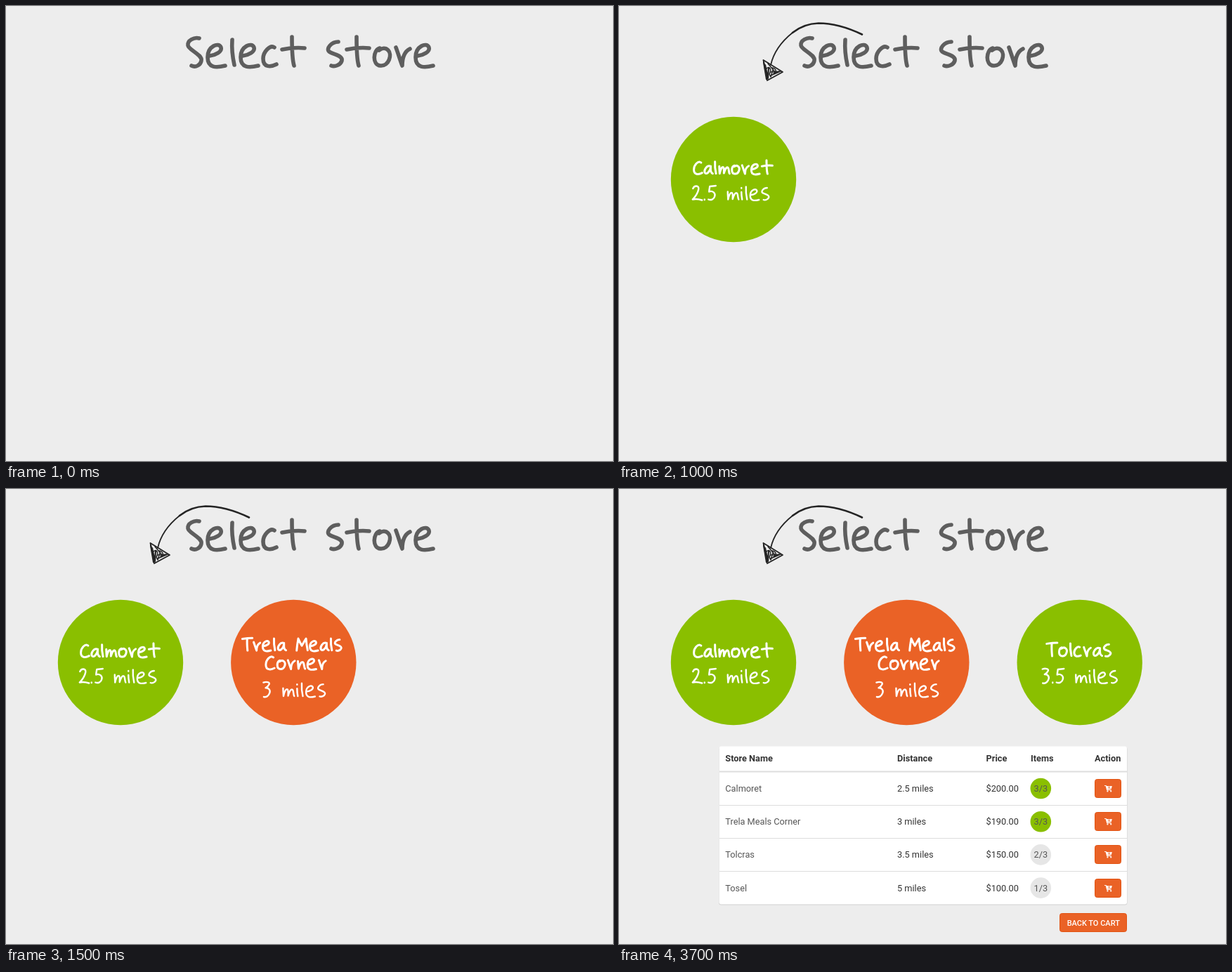
An HTML page for the animation above (4.5 s loop, 864 by 648 pixels).

```html
<!DOCTYPE html>
<html lang="en">
<head>
<meta charset="utf-8">
<title>Select store</title>
<style>
  html, body { margin: 0; width: 100%; height: 100%; overflow: hidden; background: #ededed; }
  svg { display: block; width: 864px; height: 648px; }
  text { font: 12.75px Roboto, sans-serif; fill: #333; }
  .head { font-weight: 700; }
  .name, .count { fill: #555; }
  .mid { text-anchor: middle; }
  .back { font-size: 11px; font-weight: 500; fill: #fff; }
  .hand { fill: none; stroke-linecap: round; stroke-linejoin: round; }
  .green { fill: #8abf00; }
  .orange { fill: #ea6226; }
  .grey { fill: #e6e6e6; }
  .button { fill: #ea6226; stroke: #e25312; }
  .ink { fill: none; stroke: #242424; stroke-linecap: round; stroke-linejoin: round; }

  .step { opacity: 0; animation: 4500ms step-end infinite; }
  #arrow { animation-name: show1; }
  #store1 { animation-name: show2; }
  #store2 { animation-name: show3; }
  #store3 { animation-name: show4; }
  #list { animation-name: show5; }
  @keyframes show1 { 0% { opacity: 0 } 11.1111%, 100% { opacity: 1 } }
  @keyframes show2 { 0% { opacity: 0 } 22.2222%, 100% { opacity: 1 } }
  @keyframes show3 { 0% { opacity: 0 } 33.3333%, 100% { opacity: 1 } }
  @keyframes show4 { 0% { opacity: 0 } 44.4444%, 100% { opacity: 1 } }
  @keyframes show5 { 0% { opacity: 0 } 55.5555%, 100% { opacity: 1 } }
</style>
</head>
<body>
<svg viewBox="0 0 864 648">
  <defs>
    <!-- handwriting strokes on a baseline of 0; data-w is the advance -->
    <g id="letters">
      <path data-c="S" data-w="28" d="M19-41C12-43 2-38 3-31C4-24 24-18 22-9C21-3 14 1 8-2"/>
      <path data-c="e" data-w="33" d="M6-16C14-17 24-22 22-28C19-36 3-30 3-14C3 2 16 1 28-2"/>
      <path data-c="l" data-w="14" d="M5-39C4-25 6-12 8-3"/>
      <path data-c="c" data-w="27" d="M18-28C12-32 2-22 2-12C2 1 13 0 21-4"/>
      <path data-c="t" data-w="37" d="M16-43C16-28 16-12 19-2M2-25C12-27 24-28 34-27"/>
      <path data-c="s" data-w="28" d="M18-36C8-36 0-26 5-22C10-18 25-17 23-9C21-3 13 0 8-2"/>
      <path data-c="o" data-w="32" d="M12-27C2-24 1-3 13-2C25-1 30-18 24-24C20-28 15-27 11-24"/>
      <path data-c="r" data-w="28" d="M3-28C6-20 9-10 12-2C12-12 15-22 23-26"/>
      <path data-c="m" data-w="38" d="M4-25C4-16 5-8 5-3C7-13 11-24 16-22C19-20 18-10 18-4C21-14 25-24 30-21C34-18 32-8 35-3"/>
      <path data-c="i" data-w="13" d="M5-24C5-16 6-8 7-3M5-36v1"/>
      <path data-c="a" data-w="30" d="M22-25C10-30 1-13 4-6C8 2 20-8 22-22C21-12 23-5 28-3"/>
      <path data-c="n" data-w="29" d="M4-25C5-16 5-8 6-3C8-13 13-25 19-22C23-19 21-8 25-3"/>
      <path data-c="C" data-w="32" d="M25-36C16-44 3-28 3-15C3 1 17 1 28-5"/>
      <path data-c="T" data-w="34" d="M2-38C14-40 24-41 33-41M17-39C16-26 17-12 18-2"/>
      <path data-c="M" data-w="42" d="M4-2C5-15 7-28 9-39C13-30 17-22 20-17C24-24 29-33 33-39C34-26 36-13 38-3"/>
      <path data-c="2" data-w="32" d="M4-34C8-44 22-43 20-32C18-22 10-10 3-3C12-5 20-4 30-1"/>
      <path data-c="3" data-w="28" d="M4-41C12-44 23-42 20-36C18-31 12-27 10-26C18-27 25-20 21-11C18-3 11 1 5-1"/>
      <path data-c="5" data-w="28" d="M25-42C18-41 12-41 8-40C7-34 6-29 6-25C15-29 25-22 22-12C20-4 12 0 4-3"/>
      <path data-c="." data-w="12" d="M5-3v1"/>
    </g>
    <g id="cart">
      <path d="M691 422.5h2.2l1.5 6h6" fill="none" stroke="#fff" stroke-width="1.2"/>
      <path d="M693.4 423h8.4l-1 4-6.4.8z" fill="#fff"/>
      <path d="M697.6 422.6v3.4m-1.6-1.6 1.6 1.7 1.6-1.7" fill="none" stroke="#ea6226" stroke-width=".8"/>
      <circle cx="695.4" cy="430.4" r="1.1" fill="#fff"/>
      <circle cx="700.2" cy="430.4" r="1.1" fill="#fff"/>
    </g>
  </defs>

  <g id="title"></g>

  <g id="arrow" class="step ink">
    <path d="M346 40.5C322 29 300 24.5 284 24.5C270 25 257 30 247 38" stroke-width="2.7"/>
    <path d="M247 38C232 50 220 66 216 84" stroke-width="1.8"/>
    <path d="M205.5 77L233 94L211 106Z" stroke-width="1.8"/>
    <path d="M206 80L210 104M208 84L212 103L213 88" stroke-width="2.2"/>
    <path d="M210 89C214 85 218 90 214 97L216 101L219 91M212 82L223 95M216 94L230 93L216 99M218 88C224 89 225 94 220 96" stroke-width="1.5"/>
  </g>

  <g id="store1" class="step"><circle class="green" cx="163" cy="247" r="89.2"/></g>
  <g id="store2" class="step"><circle class="orange" cx="409.3" cy="247" r="89.2"/></g>
  <g id="store3" class="step"><circle class="green" cx="655.7" cy="247" r="89.2"/></g>

  <g id="list" class="step">
    <rect x="142" y="367" width="581.5" height="225.6" rx="3.5" fill="#d2d2d2"/>
    <rect x="142.5" y="366.5" width="580.5" height="225" rx="3" fill="#fff"/>
    <path d="M143 402.5H723" stroke="#ddd" stroke-width="2"/>
    <path d="M143 450.5H723M143 497.5H723M143 544.5H723" stroke="#ddd"/>
    <g id="rows"></g>
    <rect class="button" x="627.5" y="604.5" width="95" height="26" rx="3"/>
    <text class="back mid" x="675.3" y="621.8">BACK TO CART</text>
  </g>
</svg>

<script>
  const $ = id => document.getElementById(id);
  const glyphs = {};
  for (const p of $('letters').children)
    glyphs[p.dataset.c] = { w: +p.dataset.w, d: p.getAttribute('d') };

  function add(parent, tag, attrs, text) {
    const el = document.createElementNS('http://www.w3.org/2000/svg', tag);
    for (const k in attrs) el.setAttribute(k, attrs[k]);
    if (text) el.textContent = text;
    return parent.appendChild(el);
  }

  // Handwritten line centred on x, standing on baseline y
  function write(parent, text, x, y, scale, weight, color = '#fff') {
    const chars = [...text].map(c => glyphs[c] || { w: 27 });
    const width = chars.reduce((sum, g) => sum + g.w, 0);
    const line = add(parent, 'g', {
      class: 'hand', role: 'img', 'aria-label': text,
      stroke: color, 'stroke-width': weight / scale,
      transform: `translate(${x - width * scale / 2} ${y}) scale(${scale})`
    });
    let left = 0;
    for (const g of chars) {
      if (g.d) add(line, 'path', { d: g.d, transform: `translate(${left})` });
      left += g.w;
    }
  }

  const label = (text, x, y, cls = 'cell') => add($('rows'), 'text', { x, y, class: cls }, text);

  write($('title'), 'Select store', 434.5, 87, 1, 5.6, '#5e5e5e');
  write($('store1'), 'Calmoret', 162.5, 240, .47, 3);
  write($('store1'), '2.5 miles', 159.5, 277, .5, 2.4);
  write($('store2'), 'Trela Meals', 407.5, 231, .46, 3);
  write($('store2'), 'Corner', 413, 257.5, .49, 3);
  write($('store2'), '3 miles', 410.5, 296.5, .51, 2.4);
  write($('store3'), 'Tolcras', 655, 239, .49, 3);
  write($('store3'), '3.5 miles', 656, 277, .5, 2.4);

  const cols = [['Store Name', 151.3], ['Distance', 396], ['Price', 522.5], ['Items', 586], ['Action', 677]];
  for (const [text, x] of cols) label(text, x, 388.3, 'head');

  const stores = [
    ['Calmoret', '2.5 miles', '$200.00', '3/3'],
    ['Trela Meals Corner', '3 miles', '$190.00', '3/3'],
    ['Tolcras', '3.5 miles', '$150.00', '2/3'],
    ['Tosel', '5 miles', '$100.00', '1/3']
  ];
  stores.forEach(([name, distance, price, items], i) => {
    const dy = i * 47.2, y = 431 + dy, rows = $('rows');
    label(name, 151.3, y, 'name');
    label(distance, 396, y);
    label(price, 522.5, y);
    add(rows, 'circle', { cx: 600.3, cy: 426.5 + dy, r: 14.8, class: items === '3/3' ? 'green' : 'grey' });
    label(items, 600.3, y, 'count mid');
    const top = Math.round(dy);
    add(rows, 'rect', { x: 677.5, y: 413.5 + top, width: 37, height: 26, rx: 3, class: 'button' });
    add(rows, 'use', { href: '#cart', y: top });
  });
</script>
</body>
</html>
```
